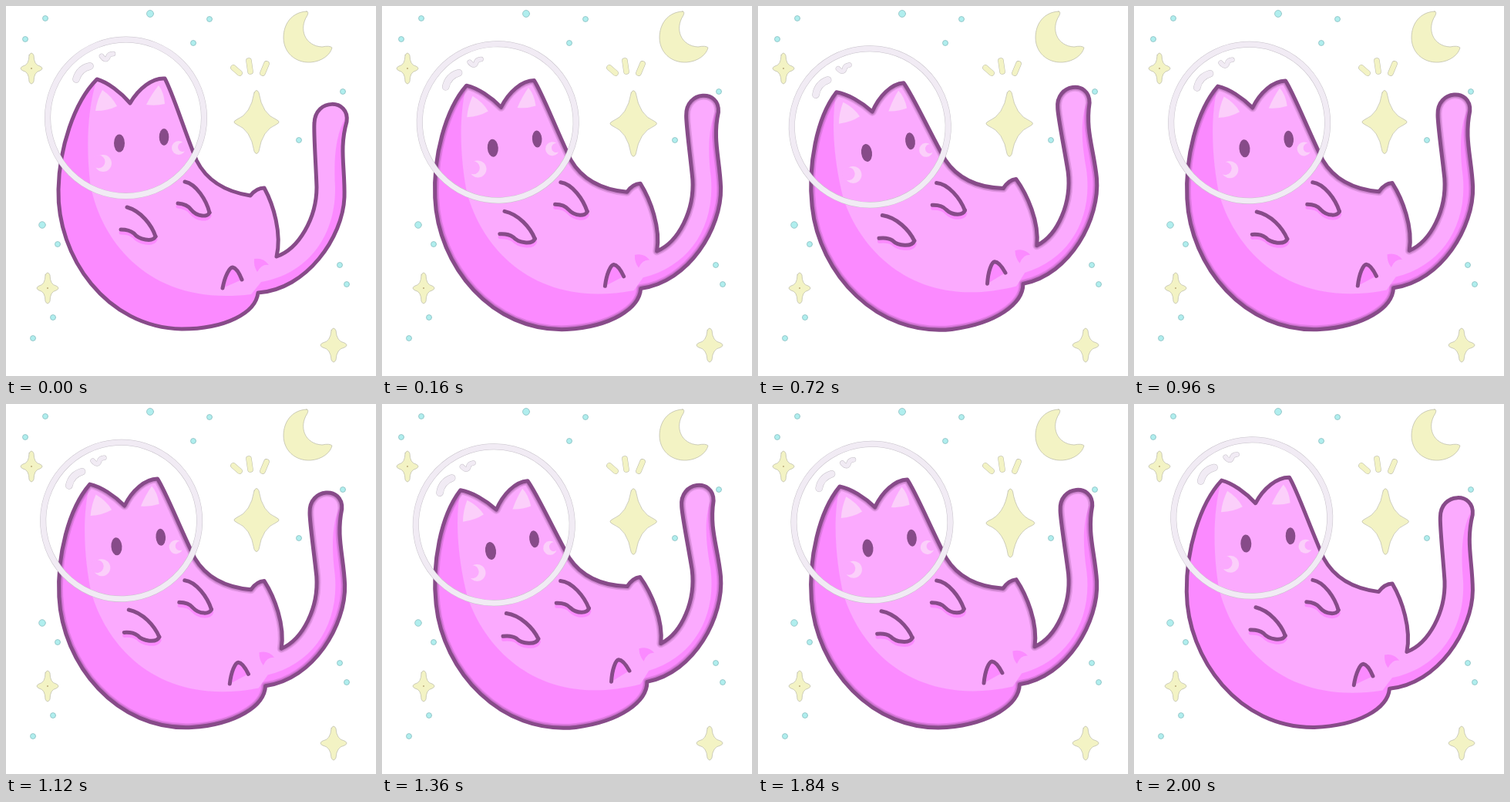
These frames come from a looping animation (480x480 px, 2080 ms). An HTML page with a canvas:

```html
<!DOCTYPE html>
<html lang="en">
<head>
<meta charset="utf-8">
<title>Space cat</title>
<style>
html, body { margin: 0; width: 100%; height: 100%; overflow: hidden; background: #fff; }
canvas { display: block; width: 480px; height: 480px; }
</style>
</head>
<body>
<canvas id="stage" width="480" height="480"></canvas>
<script>
const ctx = document.getElementById('stage').getContext('2d');
const STEP = 80, COUNT = 26, SWING = -.14;
const LINE = '#874b89', PINK = '#fb8aff', LIGHT = '#fbaafe', PALE = '#fbcffa';
const GLASS = '#f1ebf4', YELLOW = '#f3f3c4', CYAN = '#b0eeee', EDGE = '#b9b9a8';

// Tilt at each step of the half cycle; the second half runs back.
const TILT = [0, .23, .45, .65, .83, 1, 1.22, 1.09, 1, .9, .78, .65, .5, .33];

const BODY = 'M118 95C132 99 149 112 161 126C172 107 190 93 206 94C216 112 229 155 247 200' +
  'C260 226 285 241 317 246Q325 236 335 236C347 258 358 295 351 325C380 315 403 275 403 235' +
  'C402 205 399 165 400 152C401 119 446 120 442 150C432 185 440 210 439 248' +
  'C437 300 390 368 327 372C324 398 285 419 228 419C130 417 66 325 68 238C69 185 88 125 118 95Z';
const BELLY = 'M118 95C103 140 105 200 110 235C126 310 190 390 318 374L331 358' +
  'C390 348 428 300 427 235C425 200 427 165 442 143V60H118Z';
const EARS = ['M125 109Q118 122 116 136Q132 136 144 130Q138 118 125 109Z',
  'M198 103Q189 114 182 128Q194 130 206 127Q205 112 198 103Z'];
const ARMS = [
  ['M232 228C247 231 260 252 264 268', 'M264 268C262 274 248 274 240 264Q235 257 223 256'],
  ['M157 261C175 266 189 284 194 299', 'M194 299C190 307 172 303 166 295Q160 290 149 290']
];
const FOOT = 'M281 366C284 350 290 339 294 339Q300 340 306 355';
const PAW = 'M322 328Q334 326 341 336Q332 334 326 345Q321 338 322 328Z';
const SHINE = ['M91 95Q95 81 109 78', 'M124 65Q129 72 132 67Q133 62 139 62'];
const MOON = 'M390 7C370 8 360 24 360 41C360 60 375 74 395 73C410 72 421 63 423 54' +
  'Q420 51 410 53C388 52 379 30 391 12Q393 7 390 7Z';
const RAYS = 'M295 80L303 87M315 71L317 85M338 75L333 87';
const DOTS = [
  [51, 16], [25, 43], [187, 10, 4.5], [264, 17], [243, 48], [437, 111], [380, 174],
  [47, 284, 4.3], [67, 309], [61, 404], [35, 431], [433, 336], [442, 361]
];

function fill(path, color) {
  ctx.fillStyle = color;
  ctx.fill(path);
}

function stroke(path, color, width) {
  ctx.strokeStyle = color;
  ctx.lineWidth = width;
  ctx.stroke(path);
}

function edged(path, color) {
  fill(path, color);
  stroke(path, EDGE, .7);
}

function oval(x, y, rx, ry = rx, turn = 0) {
  const path = new Path2D();
  path.ellipse(x, y, rx, ry, turn, 0, Math.PI * 2);
  return path;
}

function tube(path, color, width, edge) {
  stroke(path, edge, width);
  stroke(path, color, width - 1);
}

// Four-pointed star, one rounded point and one waist per quarter turn.
function star(x, y, rx, ry, waist = .22) {
  const path = new Path2D(), tip = 3;
  for (let q = 0; q < 4; q++) {
    const c = Math.round(Math.cos(q * Math.PI / 2)), s = Math.round(Math.sin(q * Math.PI / 2));
    const r = c ? ry : rx;
    const at = (u, v) => [x + u * c + v * s, y + u * s - v * c];
    path.lineTo(...at(-tip, r - tip));
    path.quadraticCurveTo(...at(0, r + tip), ...at(tip, r - tip));
    const next = c ? rx : ry;
    path.quadraticCurveTo(...at(next * waist, r * waist), ...at(next - tip, tip));
  }
  path.closePath();
  edged(path, YELLOW);
}

function drawSky(size) {
  for (const [x, y, r = 3.5] of DOTS) {
    const dot = oval(x, y, r);
    fill(dot, CYAN);
    stroke(dot, '#86b8ba', .7);
  }
  edged(new Path2D(MOON), YELLOW);
  tube(new Path2D(RAYS), YELLOW, 7.5, EDGE);
  star(325 + size * 1.2, 150.5 + size * 2, 29 + size * 1.2, 41 + size * 1.7, .25);
  star(33, 81, 14, 20);
  star(54, 366, 14, 20);
  star(425, 440, 17, 22);
  fill(oval(33, 81, 1), '#b9a878');
  fill(oval(54, 366, 1), '#b9a878');
}

function crescent(x, y, r, dx, dy, bite) {
  fill(oval(x, y, r), PALE);
  fill(oval(x + dx, y + dy, bite), LIGHT);
}

function drawFace() {
  for (const ear of EARS) fill(new Path2D(ear), PALE);
  fill(oval(147, 178, 7, 11.5), LINE);
  fill(oval(205, 170, 6.3, 11), LINE);
  crescent(126, 204, 11, -6, -2, 8.5);
  crescent(224, 184, 9, 5, -1, 6);
}

function drawLimbs() {
  for (const [upper, lower] of ARMS) {
    const under = new Path2D(lower);
    ctx.translate(0, 4);
    stroke(under, PINK, 5);
    ctx.translate(0, -4);
    stroke(new Path2D(upper), LINE, 5);
    stroke(under, LINE, 5);
  }
  const foot = new Path2D(FOOT);
  fill(foot, PINK);
  stroke(foot, LINE, 5);
  fill(new Path2D(PAW), PINK);
}

function drawCat(soft) {
  const body = new Path2D(BODY);
  fill(body, PINK);
  ctx.save();
  ctx.clip(body);
  fill(new Path2D(BELLY), LIGHT);
  drawFace();
  drawLimbs();
  if (soft) {
    stroke(body, 'rgba(135,75,137,.2)', 11);
    stroke(body, 'rgba(135,75,137,.3)', 8);
  }
  ctx.restore();
  stroke(body, LINE, 5);
}

function drawHelmet() {
  const edge = '#c6c1c9';
  tube(oval(155.5, 145, 101.5), GLASS, 8, edge);
  SHINE.forEach((d, i) => tube(new Path2D(d), GLASS, i ? 6.5 : 9.5, edge));
}

function draw(now) {
  const i = Math.floor(now / STEP) % COUNT;
  const k = Math.min(i, COUNT - i);
  const size = k === 0 || k > 10 ? 0 : k < 3 || k > 7 ? 1 : 2;
  ctx.fillStyle = '#fff';
  ctx.fillRect(0, 0, 480, 480);
  ctx.lineCap = ctx.lineJoin = 'round';
  drawSky(size);
  ctx.save();
  ctx.translate(243, 232);
  ctx.rotate(SWING * TILT[k]);
  ctx.translate(-243, -232);
  drawCat(TILT[k] > .4);
  drawHelmet();
  ctx.restore();
}

const start = performance.now();
function tick() {
  draw(performance.now() - start);
  requestAnimationFrame(tick);
}
tick();
</script>
</body>
</html>
```
